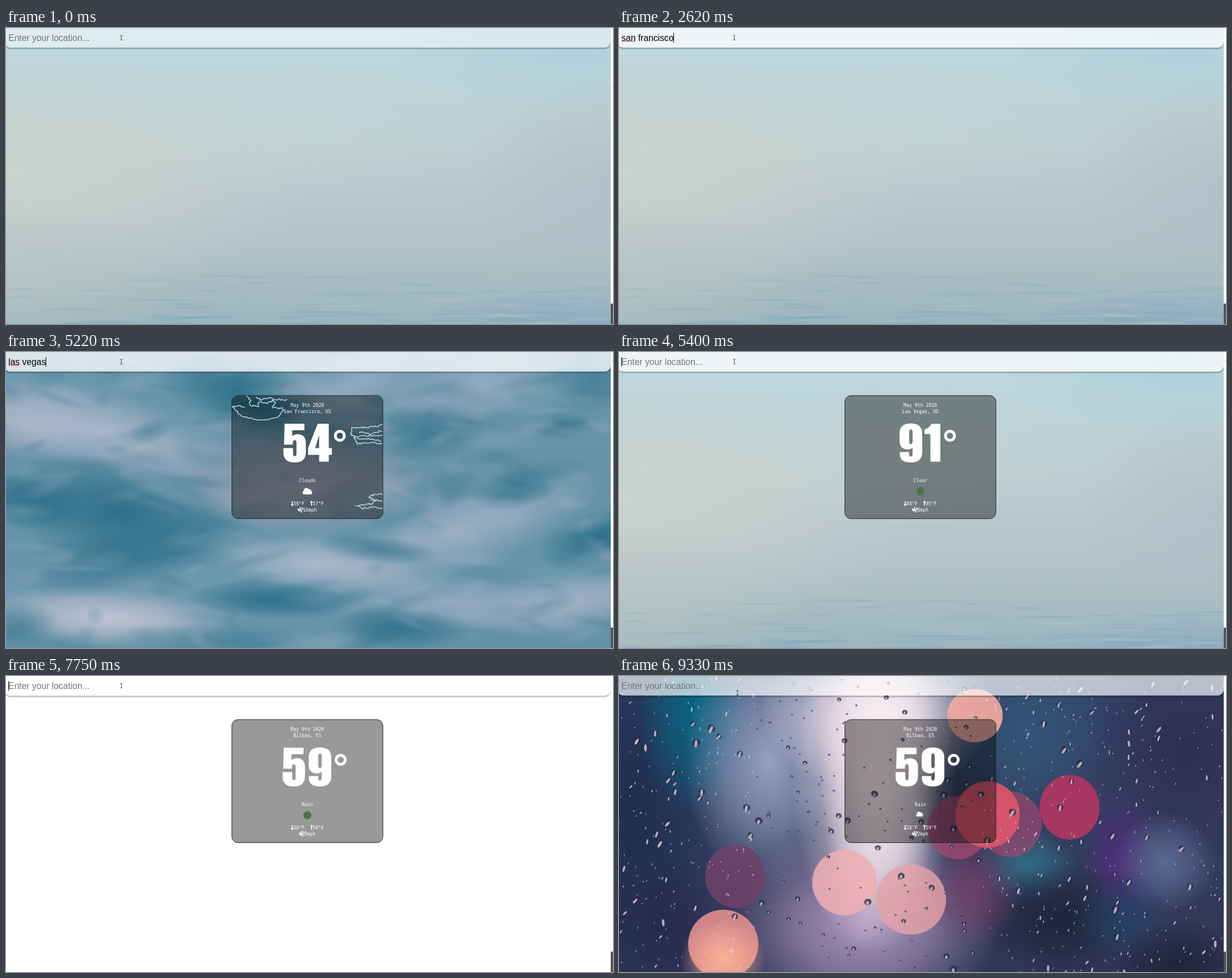
An HTML page with a canvas for the animation above (9.38 s loop, 1071 px wide and 523 px high).

```html
<!DOCTYPE html>
<html lang="en">
<head>
<meta charset="utf-8">
<title>Weather lookup</title>
<style>
html, body { margin: 0; width: 100%; height: 100%; overflow: hidden; background: #fff; }
canvas { display: block; }
</style>
</head>
<body>
<canvas id="stage" width="1071" height="523"></canvas>
<script>
const W = 1071, H = 523, LOOP = 9380, VIEW = 1067;
const ctx = document.getElementById('stage').getContext('2d');
const SANS = '15.65px "Liberation Sans", Arial, sans-serif';
const MONO = '8.2px "DejaVu Sans Mono", monospace';

const words = [
  { text: 'san francisco', keys: [1270, 1470, 1550, 1700, 1765, 1830, 1980, 2060, 2260, 2340, 2490, 2555, 2620], sent: 3050, misspelt: 3 },
  { text: 'las vegas', keys: [3870, 3985, 4100, 4480, 4560, 4740, 4890, 5120, 5220], sent: 5400, misspelt: 3 },
  { text: 'bilbao', keys: [6320, 6420, 6650, 6700, 6980, 7110], sent: 7750, misspelt: 0 }
];
const FOCUS = 500, BLUR = 9180, RAIN = 7800, BLINK = 510;
const resets = [FOCUS, RAIN, ...words.flatMap(w => [...w.keys, w.sent])].sort((a, b) => a - b);

const reports = [
  { place: 'San Francisco, US', temp: '54', left: [489.5, 533], ring: 589, sky: 'Clouds', low: 50, high: 57, wind: 16 },
  { place: 'Las Vegas, US', temp: '91', left: [495, 539], ring: 584, sky: 'Clear', low: 88, high: 95, wind: 8 },
  { place: 'Bilbao, ES', temp: '59', left: [488, 534], ring: 590.5, sky: 'Rain', low: 58, high: 59, wind: 2 }
];

// Heavy condensed numerals, 68 units tall
const digits = {
  1: 'M12 0H28V67H10.5V22Q10.5 18 8 18H0V10Q9 8 12 0Z',
  4: 'M17 0H36.5V43H42V55H36.5V67H19.5V55H0V43ZM19.5 20V43H12.5Z',
  5: 'M2 0H37V11.5H15.5V22Q19 18.5 25 18.5Q39.5 18.5 39.5 34V50Q39.5 68.5 20 68.5Q0 68.5 0 51V43H17V52Q17 57.5 20 57.5Q23 57.5 23 52V34Q23 29 20 29Q17 29 16.5 34V37H1Z',
  9: 'M20-.5Q40-.5 40 18V50Q40 68.5 20 68.5Q.5 68.5 .5 54V50H17V54Q17 58 20 58Q23 58 23 53V42Q20 45.5 15 45.5Q0 45.5 0 30V17Q0-.5 20-.5ZM17 15Q17 10 20 10Q23 10 23 15V31Q23 36 20 36Q17 36 17 31Z'
};
for (const d in digits) digits[d] = new Path2D(digits[d]);

function random(seed) {
  return () => (seed = (seed * 16807) % 2147483647) / 2147483647;
}

function layer(paint) {
  const c = document.createElement('canvas');
  c.width = VIEW;
  c.height = H;
  paint(c.getContext('2d'));
  return c;
}

function fade(g, stops) {
  const grad = g.createLinearGradient(0, 0, 0, H);
  stops.forEach((s, i) => grad.addColorStop(i / (stops.length - 1), `rgb(${s})`));
  g.fillStyle = grad;
  g.fillRect(0, 0, VIEW, H);
}

function blob(g, x, y, rx, ry, rgb, a, turn = 0) {
  const grad = g.createRadialGradient(0, 0, 0, 0, 0, 1);
  grad.addColorStop(0, `rgba(${rgb},${a})`);
  grad.addColorStop(.5, `rgba(${rgb},${a * .6})`);
  grad.addColorStop(1, `rgba(${rgb},0)`);
  g.save();
  g.translate(x, y);
  g.rotate(turn);
  g.scale(rx, ry);
  g.fillStyle = grad;
  g.fillRect(-1, -1, 2, 2);
  g.restore();
}

function oval(g, x, y, rx, ry, fill, turn = 0) {
  g.fillStyle = fill;
  g.beginPath();
  g.ellipse(x, y, rx, ry, turn, 0, 7);
  g.fill();
}

const sea = layer(g => {
  const rnd = random(41);
  fade(g, ['190,216,225', '188,211,217', '190,207,209', '183,198,205', '173,191,197', '155,181,190']);
  blob(g, 0, 260, 560, 230, '205,212,204', .8);
  blob(g, 520, 170, 300, 140, '194,212,210', .5);
  blob(g, 1067, 270, 260, 190, '175,185,197', .6);
  blob(g, 1000, 20, 320, 130, '172,206,217', .7);
  blob(g, 0, 450, 360, 130, '182,196,193', .7);
  blob(g, 1010, 523, 300, 60, '137,170,195', .6);
  for (let i = 0; i < 90; i++) {
    const d = Math.sqrt(rnd());
    blob(g, rnd() * VIEW, 425 + d * 98, 25 + rnd() * 70, 1.5 + d * 2, i % 3 ? '125,165,188' : '180,195,198', .4);
  }
});

const clouds = layer(g => {
  const rnd = random(77);
  const light = '174,183,203', dark = '42,111,136', pink = '193,195,210';
  fade(g, ['105,152,173', '106,149,170', '102,146,167', '100,147,168', '110,152,174', '98,145,167']);
  const wisp = (x, y, rx, ry, rgb, a, turn) => blob(g, x, y, rx, ry, rgb, a, turn);
  wisp(170, 140, 260, 75, light, .95, .3);
  wisp(30, 130, 130, 60, pink, .6, .2);
  wisp(600, 60, 150, 90, light, .55, -.3);
  wisp(830, 60, 170, 80, light, .6, -.2);
  wisp(520, 235, 240, 95, '165,165,184', 1, 0);
  wisp(810, 310, 260, 75, light, .75, -.35);
  wisp(550, 375, 190, 50, pink, .75, .1);
  wisp(180, 470, 240, 55, pink, 1, .06);
  wisp(980, 445, 200, 55, light, .8, -.15);
  wisp(780, 440, 170, 50, light, .6, .1);
  wisp(410, 70, 150, 65, dark, .9, .25);
  wisp(440, 100, 85, 40, dark, .7, 0);
  wisp(200, 285, 230, 95, dark, .95, .2);
  wisp(40, 265, 110, 50, dark, .9, .1);
  wisp(200, 365, 190, 60, dark, .7, -.2);
  wisp(740, 140, 110, 55, dark, .65, -.1);
  wisp(980, 130, 60, 25, dark, .6, 0);
  wisp(900, 235, 85, 42, dark, .75, -.2);
  wisp(1040, 50, 80, 50, dark, .55, 0);
  wisp(1045, 330, 110, 50, dark, .95, -.25);
  wisp(470, 438, 150, 35, dark, .95, .05);
  wisp(690, 488, 130, 38, dark, .85, .05);
  wisp(25, 480, 70, 40, dark, .5, 0);
  wisp(350, 505, 180, 26, dark, .4, 0);
  wisp(660, 350, 110, 25, dark, .6, .1);
  for (let i = 0; i < 240; i++) {
    wisp(rnd() * VIEW, rnd() * H, 18 + rnd() * 65, 7 + rnd() * 17, i % 2 ? light : dark, .12 + rnd() * .14, rnd() * .8 - .4);
  }
});

const rain = layer(g => {
  const rnd = random(19);
  fade(g, ['49,68,103', '50,64,99', '52,64,98', '48,60,93', '50,56,88', '48,54,86']);
  blob(g, 20, 230, 170, 380, '25,42,75', .8);
  blob(g, 140, 60, 110, 190, '8,100,130', 1);
  blob(g, 265, 150, 150, 230, '150,160,192', 1);
  blob(g, 430, 440, 240, 180, '172,150,190', 1);
  blob(g, 460, 60, 210, 150, '250,240,247', 1);
  blob(g, 450, 190, 145, 300, '245,225,235', 1);
  blob(g, 460, 180, 105, 270, '248,235,240', 1);
  blob(g, 720, 100, 150, 150, '50,88,122', .9);
  blob(g, 1000, 130, 170, 220, '48,40,80', .8);
  blob(g, 720, 335, 90, 70, '48,112,135', .9);
  blob(g, 885, 320, 70, 120, '82,45,125', .9);
  blob(g, 965, 330, 90, 90, '95,110,150', .9);
  blob(g, 780, 430, 150, 100, '28,34,55', .9);
  blob(g, 890, 430, 90, 80, '35,75,115', .6);
  blob(g, 985, 510, 120, 80, '28,32,54', .8);
  blob(g, 80, 440, 90, 130, '38,40,75', .7);
  blob(g, 625, 380, 85, 100, '118,62,105', .8);
  oval(g, 205, 354, 53, 56, 'rgba(112,65,105,.85)');
  oval(g, 184, 474, 62, 61, 'rgba(226,142,142,.9)');
  blob(g, 184, 500, 75, 70, '255,180,150', .9);
  oval(g, 398, 365, 57, 58, 'rgba(240,175,180,.85)');
  oval(g, 515, 395, 62, 62, 'rgba(232,163,168,.8)');
  oval(g, 628, 70, 49, 47, 'rgba(245,170,160,.9)');
  oval(g, 598, 268, 54, 56, 'rgba(165,72,112,.75)');
  oval(g, 690, 262, 56, 58, 'rgba(155,72,112,.7)');
  oval(g, 650, 245, 57, 59, 'rgba(222,86,108,.9)');
  oval(g, 795, 232, 53, 57, 'rgba(172,55,98,.95)');
  for (let i = 0; i < 900; i++) {
    const x = rnd() * VIEW, y = rnd() * H, big = rnd() ** 5, r = 1.6 + big * 4.5;
    const bright = x > 240 && x < 640;
    if (bright && i % 2) continue;
    const turn = rnd() - .2;
    if (bright || big > .5) oval(g, x, y, r * 1.15, r, 'rgba(40,45,72,.75)', turn);
    oval(g, x - r * .1, y + r * .35, r * .4, r * (bright ? .6 : 1.1), 'rgba(232,214,232,.75)', turn);
  }
});

// Ragged pale outline through a few points
function ragged(g, rnd, pts) {
  g.beginPath();
  pts.forEach(([x, y], i) => {
    const [px, py] = pts[Math.max(i - 1, 0)];
    const n = Math.ceil(Math.hypot(x - px, y - py) / 3) || 1;
    for (let k = 1; k <= n; k++) {
      g.lineTo(px + (x - px) * k / n + rnd() * 3 - 1.5, py + (y - py) * k / n + rnd() * 3 - 1.5);
    }
  });
  g.stroke();
}

function cardPath(g) {
  g.beginPath();
  g.roundRect(398.5, 77, 266.5, 217.5, 11);
}

const edges = layer(g => {
  const rnd = random(5);
  cardPath(g);
  g.clip();
  g.strokeStyle = '#b9d6da';
  g.lineWidth = 1.5;
  ragged(g, rnd, [[399, 97], [406, 103], [414, 113], [432, 117], [454, 121], [480, 115], [488, 104], [489, 98]]);
  ragged(g, rnd, [[425, 78], [431, 85], [430, 94], [445, 96], [446, 88], [460, 91], [472, 84], [496, 84]]);
  ragged(g, rnd, [[441, 80], [449, 85], [466, 80], [476, 90], [470, 99], [487, 99]]);
  ragged(g, rnd, [[399, 97], [410, 95], [421, 98]]);
  ragged(g, rnd, [[665, 127], [655, 131], [635, 134], [611, 135], [608, 144], [614, 151], [625, 148], [665, 147]]);
  ragged(g, rnd, [[614, 151], [620, 162], [645, 160], [665, 163]]);
  ragged(g, rnd, [[622, 141], [643, 145], [664, 139]]);
  ragged(g, rnd, [[618, 154], [640, 153], [662, 157]]);
  ragged(g, rnd, [[665, 252], [649, 251], [640, 257], [653, 262], [646, 268], [619, 271], [628, 277], [645, 274], [665, 277]]);
  ragged(g, rnd, [[643, 260], [665, 263]]);
});

function label(str, x, y, align = 'center') {
  ctx.font = MONO;
  ctx.textAlign = align;
  ctx.fillStyle = '#fff';
  ctx.fillText(str, x, y);
}

function cloud(x, y, s) {
  ctx.fillStyle = '#fff';
  ctx.beginPath();
  ctx.roundRect(x - 8.5 * s, y - .5 * s, 17 * s, 6 * s, 3 * s);
  ctx.arc(x - 1.5 * s, y - 1 * s, 4.8 * s, 0, 7);
  ctx.arc(x + 3.5 * s, y, 3.4 * s, 0, 7);
  ctx.fill();
}

function arrow(x, dir) {
  ctx.fillStyle = '#fff';
  ctx.fillRect(x - .8, 263.5, 1.6, 8);
  ctx.beginPath();
  ctx.moveTo(x - 2.5, 267.5 + dir * 1.5);
  ctx.lineTo(x + 2.5, 267.5 + dir * 1.5);
  ctx.lineTo(x, 267.5 + dir * 4.8);
  ctx.fill();
}

function windIcon(x, y) {
  ctx.strokeStyle = '#fff';
  ctx.lineWidth = 1.3;
  ctx.beginPath();
  ctx.moveTo(x, y - 1.7);
  ctx.lineTo(x + 4, y - 1.7);
  ctx.arc(x + 4, y - 3, 1.3, 1.57, -2, true);
  ctx.moveTo(x, y);
  ctx.lineTo(x + 7.5, y);
  ctx.arc(x + 7.5, y - 1.8, 1.8, 1.57, -2.2, true);
  ctx.moveTo(x + 1, y + 1.8);
  ctx.lineTo(x + 6, y + 1.8);
  ctx.arc(x + 6, y + 3, 1.2, -1.57, 2);
  ctx.stroke();
}

function icon(sky, t) {
  if (sky === 'Clouds') cloud(531.7, 246, 1);
  else if (sky === 'Rain' && t >= RAIN) {
    cloud(530.5, 244, .75);
    oval(ctx, 535, 247, 2, 1.5, '#bbb');
  } else oval(ctx, 531.7, 246, 7, 7, '#467548');
}

function drawCard(r, t) {
  cardPath(ctx);
  ctx.fillStyle = 'rgba(0,0,0,.4)';
  ctx.fill();
  if (r.sky === 'Clouds') ctx.drawImage(edges, 0, 0);
  cardPath(ctx);
  ctx.strokeStyle = '#20282b';
  ctx.lineWidth = 1;
  ctx.stroke();

  label('May 9th 2020', 531.7, 97);
  label(r.place, 531.7, 107.5);
  [...r.temp].forEach((d, i) => {
    ctx.save();
    ctx.translate(r.left[i], 126.7);
    ctx.fill(digits[d], 'evenodd');
    ctx.restore();
  });
  ctx.strokeStyle = '#fff';
  ctx.lineWidth = 5;
  ctx.beginPath();
  ctx.arc(r.ring, 148, 8, 0, 7);
  ctx.stroke();

  label(r.sky, 531.7, 230);
  icon(r.sky, t);
  arrow(505, 1);
  label(r.low + '°F', 507, 271, 'left');
  arrow(539, -1);
  label(r.high + '°F', 541, 271, 'left');
  const speed = r.wind + 'mph';
  label(speed, 536, 282);
  windIcon(r.wind > 9 ? 514.5 : 517, 279);
}

const clamp = v => Math.min(1, Math.max(0, v));
const ease = v => v * v * (3 - 2 * v);

function drawBar(t) {
  const focus = ease(clamp((t - FOCUS) / 300)) - ease(clamp((t - BLUR) / 400));
  const bar = new Path2D(), below = new Path2D();
  bar.roundRect(-3, -20, 1070, 54.5, 11);
  below.rect(0, 0, W, H);
  below.addPath(bar);
  ctx.save();
  ctx.clip(below, 'evenodd');
  ctx.fillStyle = 'rgba(0,0,0,.22)';
  ctx.beginPath();
  ctx.roundRect(-3, -17, 1070, 54.5, 11);
  ctx.fill();
  ctx.restore();
  ctx.fillStyle = `rgba(255,255,255,${.5 + .25 * focus})`;
  ctx.fill(bar);
}

function drawInput(t) {
  const word = words.find(w => t < w.sent);
  const count = word ? word.keys.filter(k => k <= t).length : 0;
  const typed = count ? word.text.slice(0, count) : '';
  const x = 4.2;
  ctx.font = SANS;
  ctx.textAlign = 'left';
  ctx.fillStyle = typed ? '#000' : '#757575';
  ctx.fillText(typed || 'Enter your location...', x, 22.5);

  if (typed && word.misspelt && count > word.misspelt) {
    const end = x + ctx.measureText(word.text.slice(0, word.misspelt)).width;
    ctx.strokeStyle = '#e8403c';
    ctx.lineWidth = .9;
    ctx.beginPath();
    for (let px = x; px <= end; px += .5) ctx.lineTo(px, 23.8 + .9 * Math.sin((px - x) * 1.9));
    ctx.stroke();
  }

  const last = resets.filter(r => r <= t).pop();
  if (t >= FOCUS && t < BLUR && (t - last) % (2 * BLINK) < BLINK) {
    ctx.fillStyle = '#000';
    ctx.fillRect(Math.round(x + ctx.measureText(typed).width), 9, 1, 17);
  }
}

function drawPointer(t) {
  const dip = Math.sin(Math.PI * clamp((t - 420) / 360));
  const leave = clamp((t - BLUR + 40) / 190);
  const x = 203.5 + 4 * dip + 5.5 * leave, y = 17 + 12.5 * Math.max(dip, leave);
  ctx.strokeStyle = '#4c5357';
  ctx.lineWidth = 1;
  ctx.beginPath();
  ctx.moveTo(x - 2, y - 4);
  ctx.lineTo(x + 2, y - 4);
  ctx.moveTo(x, y - 4);
  ctx.lineTo(x, y + 4);
  ctx.moveTo(x - 2, y + 4);
  ctx.lineTo(x + 2, y + 4);
  ctx.stroke();
}

function drawMargin() {
  ctx.fillStyle = '#fff';
  ctx.fillRect(VIEW, 0, 4, H);
  ctx.fillStyle = '#ddd';
  ctx.fillRect(VIEW, 15, 4, 1);
  ctx.fillRect(VIEW, 103, 4, 1);
  ctx.fillStyle = '#555';
  ctx.fillRect(VIEW, 487, 4, 36);
}

function draw(t) {
  const sent = words.filter(w => w.sent <= t).length;
  const photo = [sea, clouds, sea, t >= RAIN ? rain : null][sent];
  ctx.fillStyle = '#fff';
  ctx.fillRect(0, 0, W, H);
  if (photo) ctx.drawImage(photo, 0, 0);
  drawBar(t);
  if (sent) drawCard(reports[sent - 1], t);
  drawInput(t);
  drawPointer(t);
  drawMargin();
}

const start = performance.now();
function tick() {
  draw((performance.now() - start) % LOOP);
  requestAnimationFrame(tick);
}
tick();
</script>
</body>
</html>
```
